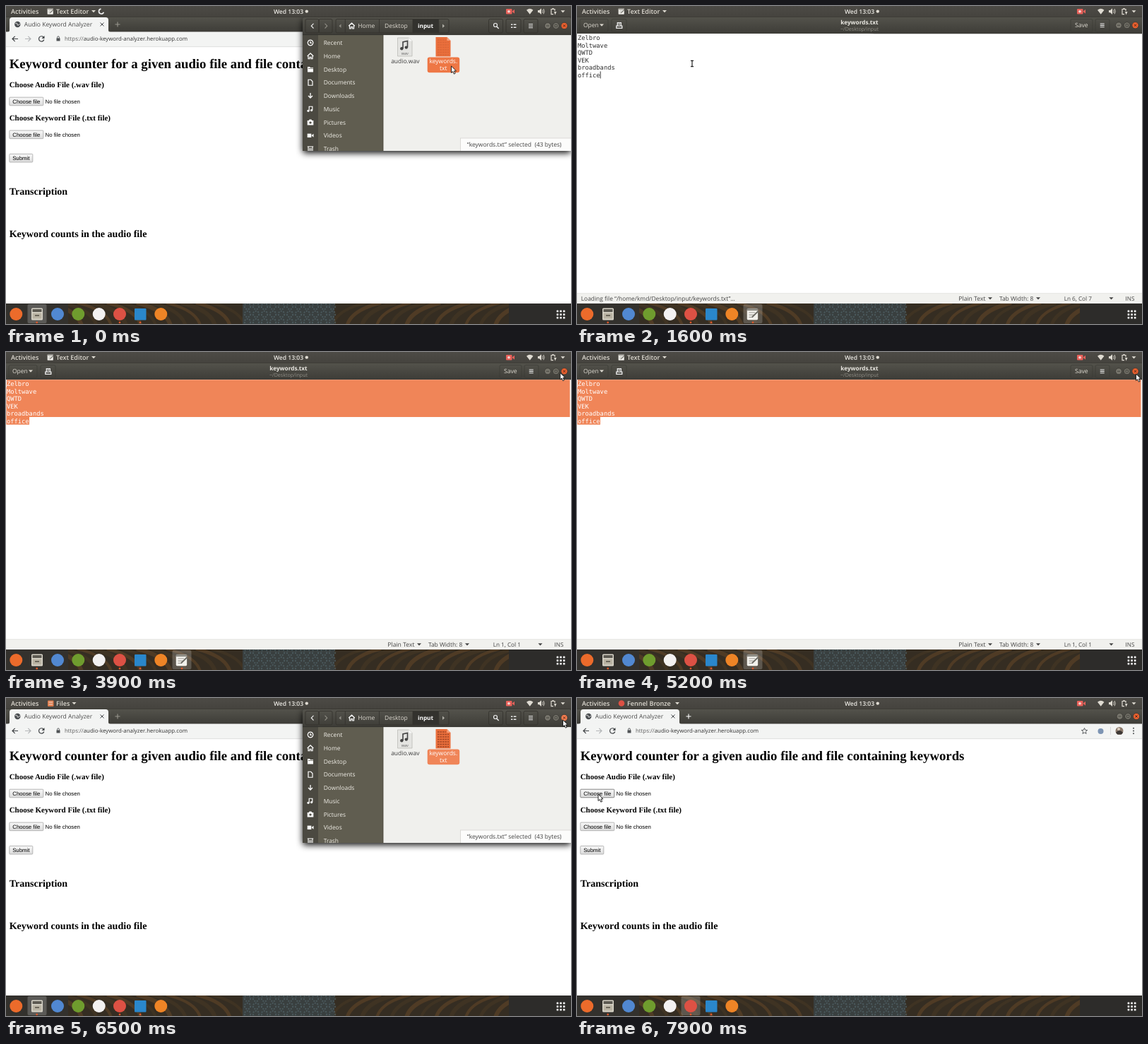
An HTML page for the animation above (8000 ms loop, 800 by 450 pixels).

```html
<!DOCTYPE html>
<html lang="en">
<head>
<meta charset="utf-8">
<title>Desktop session</title>
<style>
html, body { margin: 0; width: 100%; height: 100%; overflow: hidden; background: #fff; }
svg { display: block; width: 100%; height: 100%; }
text { white-space: pre; font-family: "Open Sans", "Noto Sans", sans-serif; text-rendering: geometricPrecision; }
.serif { font-family: "Liberation Serif", serif; font-weight: bold; }
.form { font-family: "Liberation Sans", sans-serif; }
.mono { font-family: "DejaVu Sans Mono", monospace; }
.semi { font-weight: 600; }
.bold { font-weight: 700; }
.mid { text-anchor: middle; }
.shadow { filter: drop-shadow(0 3px 5px rgba(0,0,0,.95)); }
</style>
</head>
<body>
<svg id="stage" viewBox="0 0 800 450" xmlns="http://www.w3.org/2000/svg"></svg>
<script>
const LOOP = 8000, STEP = 100;

// Drawing helpers returning SVG markup
const rect = (x, y, w, h, fill, more = '') => `<rect x="${x}" y="${y}" width="${w}" height="${h}" fill="${fill}" ${more}/>`;
const disc = (x, y, r, fill, more = '') => `<circle cx="${x}" cy="${y}" r="${r}" fill="${fill}" ${more}/>`;
const shape = (d, fill, more = '') => `<path d="${d}" fill="${fill}" ${more}/>`;
const line = (d, color, width = 1, more = '') => `<path d="${d}" fill="none" stroke="${color}" stroke-width="${width}" ${more}/>`;
const text = (x, y, size, str, fill, cls = '', more = '') =>
  `<text x="${x}" y="${y}" font-size="${size}" fill="${fill}" class="${cls}" ${more}>${str}</text>`;
const group = (id, body, more = '') => `<g id="${id}" ${more}>${body}</g>`;
const at = (x, y, body) => `<g transform="translate(${x} ${y})">${body}</g>`;
const caretDown = (x, y, fill) => shape(`M${x - 3} ${y - 1.5}h6l-3 3.2z`, fill);
const fade = (id, top, bottom) => `<linearGradient id="${id}" x2="0" y2="1"><stop stop-color="${top}"/><stop offset="1" stop-color="${bottom}"/></linearGradient>`;
const PALE = '#dfdbd2';

const defs = `<defs>
${fade('barFill', '#4d4b46', '#45433e')}${fade('headFill', '#54534c', '#3d3c37')}${fade('buttonFill', '#f8f8f8', '#dcdcdc')}
<clipPath id="filesClip"><path d="M420 205V20q0-4 4-4H796q4 0 4 4V205z"/></clipPath>
<clipPath id="dockClip"><path d="M0 421H800V450H0z"/></clipPath>
<clipPath id="selectClip"><path id="selectClipPath"/></clipPath>
</defs>`;

function windowButtons(x, y, id) {
  const grey = dx => disc(x + dx, y, 4.4, '#77756c', 'stroke="#34332e" stroke-width=".7"');
  return grey(0) + grey(11.7) + line(`M${x - 2} ${y}h4M${x + 10} ${y - 1.7}h3.4v3.4h-3.4z`, '#3b3a35', .8) +
    disc(x + 23.5, y, 4.6, '#e9602f', `id="${id}" stroke="#34332e" stroke-width=".7"`) +
    line(`M${x + 21.9} ${y - 1.6}l3.2 3.2m0-3.2l-3.2 3.2`, '#4a2416', .9);
}

function noteIcon(x, y, s) {
  return `<g transform="translate(${x} ${y}) scale(${s})">` + rect(-7.5, -7, 14, 14.5, '#f2f1ec', 'rx="1.5"') +
    rect(-7.5, -7, 14, 2.5, '#8b8982') + line('M-5-2h8M-5 1h7M-5 4h5', '#a2a19b', 1) +
    line('M-1 4L7-4', '#6b6963', 1.8) + '</g>';
}

function browser() {
  const button = (y, w, label, id = '') => rect(4.8, y, w, 11.6, 'url(#buttonFill)', `id="${id}" stroke="#a5a5a5" stroke-width=".8" rx="1"`) +
    text(4.8 + w / 2, y + 8.6, 7.81, label, '#000', 'form mid');
  const heading = (y, size, str) => text(4.7, y, size, str, '#000', 'serif');
  const none = y => text(55.5, y, 7.81, 'No file chosen', '#000', 'form');
  return rect(0, 15, 800, 22, 'url(#headFill)') +
    shape('M2 37q3 0 3-3V20q0-4 4-4H141q4 0 4 4V34q0 3 3 3z', '#f3f4f3') +
    disc(16.3, 26, 4.2, '#4a4d50') + line('M13 25q3-2 3 1t4-1', '#e5e5e5', 1) +
    text(25.8, 29, 8.55, 'Audio Keyword Analyzer', '#4b4b4b') +
    line('M133.5 23.5l5 5m0-5l-5 5', '#44474a') +
    line('M154.5 26h7M158 22.5v7', '#fff', 1.1, 'id="newTab"') +
    windowButtons(768.5, 26, 'browserClose') +
    rect(0, 36.5, 800, 21.5, '#f3f4f3') + rect(0, 57.5, 800, .8, '#d2d2d2') +
    line('M17 46.5h-8m3.7-3.7L9 46.5l3.7 3.7', '#3f4245', 1.2) +
    line('M27 46.5h8m-3.7-3.7L35 46.5l-3.7 3.7', '#b4b6b8', 1.2) +
    line('M53 44a3.7 3.7 0 1 0 .8 3.5', '#3f4245', 1.2) + shape('M54.5 42v4h-4z', '#3f4245') +
    rect(71.5, 45.5, 5, 4, '#4f5255') + line('M72.6 46v-1.7a1.4 1.4 0 0 1 2.8 0V46', '#4f5255', .9) +
    text(83, 49.2, 7.85, '<tspan fill="#5f5f5f">https://</tspan>audio-keyword-analyzer.herokuapp.com', '#333') +
    line('M718.5 42.5l1.2 2.8 3 .2-2.3 2 .7 3-2.6-1.6-2.6 1.6.7-3-2.3-2 3-.2z', '#505356', .9) +
    disc(741.5, 47, 4, '#7d94b3') + rect(755, 41, .7, 11, '#ccc') +
    disc(768, 46.5, 5.5, '#8c7a6c') + shape('M763 49q5-6 10 0l-2 2.5h-6z', '#3d3835') + disc(767, 44, 2, '#d8cbbd') +
    [42.7, 46.5, 50.3].map(y => disc(788, y, 1, '#4a4d50')).join('') +
    rect(0, 58.3, 800, 363, '#fff') +
    heading(87.6, 18.74, 'Keyword counter for a given audio file and file containing keywords') +
    heading(115, 10.96, 'Choose Audio File (.wav file)') + button(129.2, 48, 'Choose file', 'chooseAudio') + none(137.8) +
    heading(161.9, 10.96, 'Choose Keyword File (.txt file)') + button(176.1, 48, 'Choose file') + none(184.7) +
    button(209.4, 33, 'Submit') +
    heading(267, 14.06, 'Transcription') + heading(327.3, 14.06, 'Keyword counts in the audio file');
}

function fileManager() {
  const places = {
    Recent: line('M0-3.8a3.8 3.8 0 1 0 .1 0M0-2.3V.3h2', '#fff', 1.2),
    Home: line('M-4.3.3L0-3.8 4.3.3M-3 0v4h2V1.5h2V4h2V0', '#fff', 1.2),
    Desktop: shape('M-4-3.5h3l1 1.2h4V4h-8z', '#fff') + line('M-3-1h7', '#54524a', .7),
    Documents: line('M-3-4h3.7L3-1.5V4h-6z', '#fff', 1.2),
    Downloads: line('M0-4v7M-3 0l3 3 3-3', '#fff', 1.3),
    Music: line('M-1.8 2.5v-6h4.6v5', '#fff', 1.2) + disc(-3, 2.6, 1.6, '#fff') + disc(1.6, 1.8, 1.6, '#fff'),
    Pictures: shape('M-4.3-2.5h2l1-1.5h2.6l1 1.5h2V4h-8.6z', '#fff') + disc(0, .6, 1.7, '#54524a'),
    Videos: rect(-4.3, -2.6, 5.6, 5.4, '#fff') + shape('M1.5 0l3-2.4v5z', '#fff'),
    Trash: line('M-4.2-3h8.4M-3-2.5V4.5h6V-2.5M-1-1v5M1-1v5', '#fff', 1.1)
  };
  const rows = Object.entries(places).map(([name, icon], i) => {
    const y = 52 + i * 18.75;
    return at(431, y, icon) + text(449.7, y + 3, 8.4, name, '#f1efe8');
  }).join('');
  const headButton = (x, w, fill = 'none') => rect(x, 18.5, w, 19.5, fill, 'stroke="#33322d" stroke-width=".8" rx="2"');
  const header = rect(420, 16, 380, 25, 'url(#headFill)') + rect(420, 40.3, 380, .8, '#2f2e2a') +
    headButton(424, 19) + headButton(443, 19) + line('M435.5 24.8l-3.2 3.4 3.2 3.4', '#eee', 1.2) +
    line('M451.5 24.8l3.2 3.4-3.2 3.4', '#8d8b83', 1.2) +
    headButton(467, 160) + rect(576, 19, 36.5, 18.8, '#33322e') +
    shape('M474.5 25.5v5.4l-3-2.7z', '#8d8b83') + shape('M618 25.5v5.4l3-2.7z', '#b1afa7') +
    line('M480.3 19v18.5M528.5 19v18.5M576 19v18.5M612.7 19v18.5', '#33322d', .8) +
    at(489.5, 28, places.Home) + text(498.3, 31.3, 8.5, 'Home', PALE) + text(536, 31.3, 8.5, 'Desktop', PALE) +
    text(583, 31.3, 8.2, 'input', '#fff', 'bold') +
    headButton(683.5, 20) + headButton(708, 21) + headButton(733, 20) +
    line('M694.7 29l3 3', '#eee', 1.4) + disc(693, 27, 2.5, 'none', 'stroke="#eee" stroke-width="1.2"') +
    line('M715 26.2h2.4M715 30.2h2.4M718.8 26.2h3.6M718.8 30.2h3.6', '#eee', 1.6) +
    line('M740 25.8h6M740 28.3h6M740 30.8h6', '#eee', 1.1) + windowButtons(767, 28, 'filesClose');
  const audio = shape('M554.5 45h16l4.5 4.5V71h-20.5z', '#e4e4e1', 'stroke="#b5b5b0" stroke-width=".7"') +
    shape('M570.5 45v4.5h4.5z', '#fafafa') + line('M562 60v-9l6.5-1.5v9', '#444', 1.6) +
    disc(560.3, 60.2, 2.2, '#444') + disc(566.8, 58.6, 2.2, '#444') +
    text(564.8, 69, 5.6, 'wav', '#666', 'mid') + text(565.3, 81, 8.5, 'audio.wav', '#3b3b3b', 'mid');
  const keywords = shape('M608.5 44h16l5 5v22.5h-21z', '#ea6f3c') + shape('M624.5 44v5h5z', '#f6a27e') +
    line('M611 48h12M611 51.5h16M611 55h16M611 58.5h16M611 62h16M611 65.5h16M611 69h16', '#80331a', 1.5, 'id="iconLines" stroke-dasharray="2.5 1"') +
    rect(596.7, 72.5, 45.5, 21.8, '#ee7745', 'rx="3" id="iconLabel"') +
    text(619.3, 81, 8.5, 'keywords.', '#fff', 'mid') + text(619.3, 91.3, 8.5, 'txt', '#fff', 'mid');
  const body = rect(420, 41, 380, 164, '#f0f0ed') + rect(420, 41, 114, 164, '#605d50') + rect(420, 41, 22, 164, '#4b4941') +
    rect(533.6, 41, .8, 164, '#464439') + rows + header + audio + keywords +
    rect(643.5, 187, 157, 19, '#fcfcfb', 'stroke="#d4d3cf" stroke-width=".8"') +
    text(652.7, 199, 8.5, '“keywords.txt” selected  (43 bytes)', '#444');
  return rect(420, 16, 380, 189, '#555', 'rx="4" class="shadow"') + `<g clip-path="url(#filesClip)">${body}</g>`;
}

const WORDS = ['Zelbro', 'Moltwave', 'QWTD', 'VEK', 'broadbands', 'office'];
const PITCH = 10.55, CHAR = 5.27;

function editor() {
  const words = fill => WORDS.map((w, i) => text(1, 48 + i * PITCH, 8.75, w, fill, 'mono')).join('');
  const headButton = (x, w) => rect(x, 18.5, w, 18, 'none', 'stroke="#3a3934" stroke-width=".6" rx="2"');
  return rect(0, 15, 800, 24.3, 'url(#headFill)') + headButton(4, 40) + headButton(49, 21) + headButton(699, 31) + headButton(734, 20) +
    text(9, 30.2, 8.5, 'Open', PALE) + caretDown(35, 27, PALE) +
    line('M57.3 27.5v-3.8h5v3.8M55.8 28.2h8v3.2h-8z', '#eee', 1.3) + shape('M58.2 26.3l1.6-2 1.6 2z', '#eee') +
    text(400, 26.3, 8.2, 'keywords.txt', '#eceae4', 'bold mid') + text(400, 35, 7.1, '~/Desktop/input', '#918f87', 'mid') +
    text(705, 30.2, 8.6, 'Save', PALE) + line('M740.7 25h6M740.7 27.4h6M740.7 29.8h6', '#eee', 1.1) +
    windowButtons(767, 27.3, 'editorClose') +
    rect(0, 39.3, 800, 368, '#fff') + words('#303030') +
    shape('', '#f08558', 'id="selection"') + `<g clip-path="url(#selectClip)">${words('#fff')}</g>` +
    rect(32.7, 92.5, .9, 10, '#222', 'id="caret"') +
    rect(0, 406.7, 800, 15, '#f1f1ee') + rect(0, 406.5, 800, .6, '#d9d8d4') +
    text(5.7, 417, 8.42, 'Loading file “/home/kmd/Desktop/input/keywords.txt”…', '#444', '', 'id="loading"') +
    text(540.3, 417, 8.6, 'Plain Text', '#444') + caretDown(585, 413.7, '#444') +
    text(598, 417, 8.4, 'Tab Width: 8', '#444') + caretDown(653, 413.7, '#444') +
    text(689.7, 417, 8.2, '', '#444', '', 'id="position"') + caretDown(756.5, 413.7, '#444') + text(776.5, 417, 8.2, 'INS', '#444');
}

const MENUS = [
  { label: 'Text Editor', caret: 124, icon: noteIcon(63, 7.5, .58) },
  { label: 'Files', caret: 96.5, icon: rect(59, 3.5, 8.5, 8.5, '#dd7b4c', 'rx="1"') + line('M60.5 6h5.5M60.5 9h5.5', '#f3e2d6', 1.2) },
  { label: 'Fennel Bronze', caret: 142, icon: disc(63, 7.5, 4.3, '#dd5144') }
];

function topBar() {
  const menus = MENUS.map((m, i) => group('menu' + i, m.icon + text(71, 10.8, 9, m.label, PALE, 'semi') + caretDown(m.caret, 7.5, PALE))).join('');
  return rect(0, 0, 800, 15.4, 'url(#barFill)') + rect(0, 15, 800, .6, '#34332e') + text(7, 10.8, 9, 'Activities', PALE, 'semi') + menus +
    group('spinner', line('M-.5-3.4a3.5 3.5 0 1 0 3.8 4.6', '#eee', 1.7)) +
    text(400, 10.8, 8.55, 'Wed 13:03', '#eceae4', 'semi mid') + disc(425.8, 7.6, 2.2, '#dfdbd2') +
    rect(708, 4, 8.5, 7.5, '#e8615a', 'rx="1"') + disc(712, 7.7, 1.8, '#f4d9d6') + shape('M716.5 7.7l3.5-3v6z', '#e8615a') +
    shape('M741.7 11.7l-4.7-6q4.7-4 9.4 0z', PALE) +
    shape('M753 6h2l3-2.7v8.8L755 9.3h-2z', PALE) + line('M759.5 5.5q1.5 2.2 0 4.4M761 4q2.5 3.7 0 7.3', PALE, .9) +
    line('M775 11.7h-3V4.5h5V7M773.5 3.5h2', PALE, 1.2) + shape('M776 8h3.5l-2 4.5z', PALE) + caretDown(788.5, 7.7, PALE);
}

function dock() {
  let tubes = '', mosaic = '';
  for (let i = 0; i < 13; i++) tubes += line(`M${462 + i * 21} 452q6-22 48-32`, i % 2 ? '#6a4a28' : '#4a3a24', 4 + i % 3);
  for (let i = 0; i < 33; i++) mosaic += disc(342 + (i % 11) * 12, 425 + Math.floor(i / 11) * 11, 4.2, 'none', 'stroke="#566a70" stroke-width="2" stroke-dasharray="2 1.6"');
  const icons = [disc(14.3, 436, 9, '#ec6b2b'),
    rect(36, 427.5, 16, 17, '#d8d4c8', 'rx="1.5"') + rect(37.5, 429, 13, 4, '#5d5a52') + rect(37.5, 434.5, 13, 8, '#b9b3a3') + rect(41, 437, 6, 2, '#6c675c'),
    disc(73, 436, 9, '#5188d1'), disc(102.3, 436, 9, '#6f9c2e'), disc(131.7, 436, 9, '#f3f1f1'),
    disc(161, 436, 9, '#dd5144'), rect(182, 428, 16.5, 16.5, '#2a87cb', 'rx="1"'), disc(219.3, 436, 9, '#ee8426')].join('');
  let grid = '';
  for (let i = 0; i < 9; i++) grid += rect(779.6 + (i % 3) * 4.6, 430.6 + Math.floor(i / 3) * 4.6, 2.7, 2.7, '#f1f1f1', 'rx=".6"');
  const dot = x => disc(x, 447.8, 1.4, '#e0572a');
  return `<g clip-path="url(#dockClip)">` + rect(0, 421, 800, 29, '#352d22') +
    `<g opacity=".5">${tubes}<g transform="translate(800 0) scale(-1 1)">${tubes}</g></g>` +
    rect(335, 421, 130, 29, '#393f3f') + `<g opacity=".6">${mosaic}</g>` + rect(0, 421, 88, 29, '#33312d') + rect(712, 421, 88, 29, '#2d2c2a') +
    rect(0, 422, 27, 27, '#fff', 'id="highlight" opacity=".2" rx="2"') + icons + dot(43.7) + dot(161) + dot(190) +
    group('dockEditor', noteIcon(249, 436, 1.1) + dot(249)) + grid + '</g>';
}

const arrow = shape('M0 0V9.5L2.2 7.6 3.8 11.2 5.6 10.4 4 6.9H7z', '#fff', 'stroke="#111" stroke-width=".9" stroke-linejoin="round"');
const beamPath = 'M-2-4.2H2M-2 4.2H2M0-4.2V4.2';
const beam = line(beamPath, '#fff', 2.4) + line(beamPath, '#222', 1.2);

document.getElementById('stage').innerHTML = defs + group('browser', browser()) + group('files', fileManager()) +
  group('editor', editor()) + topBar() + dock() + group('arrow', arrow) + group('beam', beam);

const el = {};
document.querySelectorAll('[id]').forEach(node => el[node.id] = node);

// Pointer: time, x, y
const POINTER = [
  [0, 630.5, 85], [100, 628, 88], [500, 560, 140], [900, 424, 199], [1200, 163, 95], [1400, 163, 95], [1600, 163, 81.5],
  [1800, 34, 98], [1900, 22, 97], [2000, 12, 87], [2100, 6, 72], [2200, 6, 54], [2300, 5, 40], [2800, 5, 40],
  [2900, 399.5, 2], [3000, 418, 6], [3100, 418, 6], [3500, 778, 28], [3700, 778, 28], [4100, 791.5, 31],
  [5800, 791.5, 31], [6100, 742, 42], [6300, 790, 34], [6400, 790, 34], [6500, 788.5, 31], [7100, 788.5, 31],
  [7400, 108, 182], [7600, 108, 182], [7900, 30, 136]
];
// Selection start: time, line, column
const SELECTION = [[1900, 5, 4], [2000, 4, 2], [2100, 3, 1], [2200, 1, 1], [2300, 0, 0]];
// Windows: time, opacity, scale
const EDITOR = [[0, 0, 1], [600, .35, .87], [700, .85, .97], [800, 1, 1], [5500, .3, .87], [5600, 0, 1]];
const FILES = [[0, 1, 1], [7100, .3, .85], [7200, .08, .81], [7300, 0, 1]];

const stepAt = (table, t) => table.filter(row => row[0] <= t).pop();

function pointerAt(t) {
  const i = POINTER.findIndex(p => p[0] > t);
  if (i < 0) return POINTER[POINTER.length - 1].slice(1);
  const [t0, x0, y0] = POINTER[i - 1], [t1, x1, y1] = POINTER[i], k = (t - t0) / (t1 - t0);
  return [x0 + (x1 - x0) * k, y0 + (y1 - y0) * k];
}

function selectionPath([, row, col]) {
  const x = 1 + col * CHAR, y = 39.3 + row * PITCH;
  return row === 5 ? `M${x} 92H33V102.7H${x}z` : `M${x} ${y}H798.5V92H33V102.7H.5V${y + PITCH}H${x}z`;
}

const show = (node, on) => { node.style.display = on ? '' : 'none'; };

function placeWindow(node, [, opacity, scale], cx, cy) {
  show(node, opacity > 0);
  node.setAttribute('opacity', opacity);
  node.setAttribute('transform', `translate(${cx} ${cy}) scale(${scale}) translate(${-cx} ${-cy})`);
}

function render(t) {
  placeWindow(el.editor, stepAt(EDITOR, t), 400, 218);
  placeWindow(el.files, stepAt(FILES, t), 610, 112);

  const app = t < 5600 ? 0 : t < 7100 ? 1 : 2;
  MENUS.forEach((_, i) => show(el['menu' + i], i === app));
  show(el.spinner, t < 800);
  el.spinner.setAttribute('transform', `translate(135 7.5) rotate(${t * .45})`);
  const editing = t >= 700 && t < 5600;
  show(el.dockEditor, editing);
  el.highlight.setAttribute('x', editing ? 235.5 : app === 2 ? 147.5 : 30.5);
  el.newTab.setAttribute('stroke', app === 2 ? '#fff' : '#98968e');

  const sel = stepAt(SELECTION, t), path = sel ? selectionPath(sel) : '';
  el.selection.setAttribute('d', path);
  el.selectClipPath.setAttribute('d', path);
  show(el.caret, !sel);
  const [, row, col] = sel || [0, 5, 6];
  el.position.textContent = `Ln ${row + 1}, Col ${col + 1}`;
  show(el.loading, t < 3300);

  el.editorClose.setAttribute('fill', t >= 4000 && t < 5200 ? '#f47d50' : '#e9602f');
  el.filesClose.setAttribute('fill', t >= 5600 && t < 6800 ? '#f47d50' : '#e9602f');
  el.iconLines.setAttribute('opacity', app === 1 ? .7 : .14);
  el.iconLabel.setAttribute('fill', app === 1 ? '#f08558' : '#ee7745');
  el.chooseAudio.setAttribute('stroke', t >= 7800 ? '#666' : '#a5a5a5');

  const [x, y] = pointerAt(t), typing = t >= 800 && t < 2900;
  show(el.arrow, !typing);
  show(el.beam, typing);
  (typing ? el.beam : el.arrow).setAttribute('transform', `translate(${x} ${y})`);
}

const start = performance.now();
function tick() {
  const t = (performance.now() - start) % LOOP;
  render(Math.floor(t / STEP) * STEP);
  requestAnimationFrame(tick);
}
tick();
</script>
</body>
</html>
```
